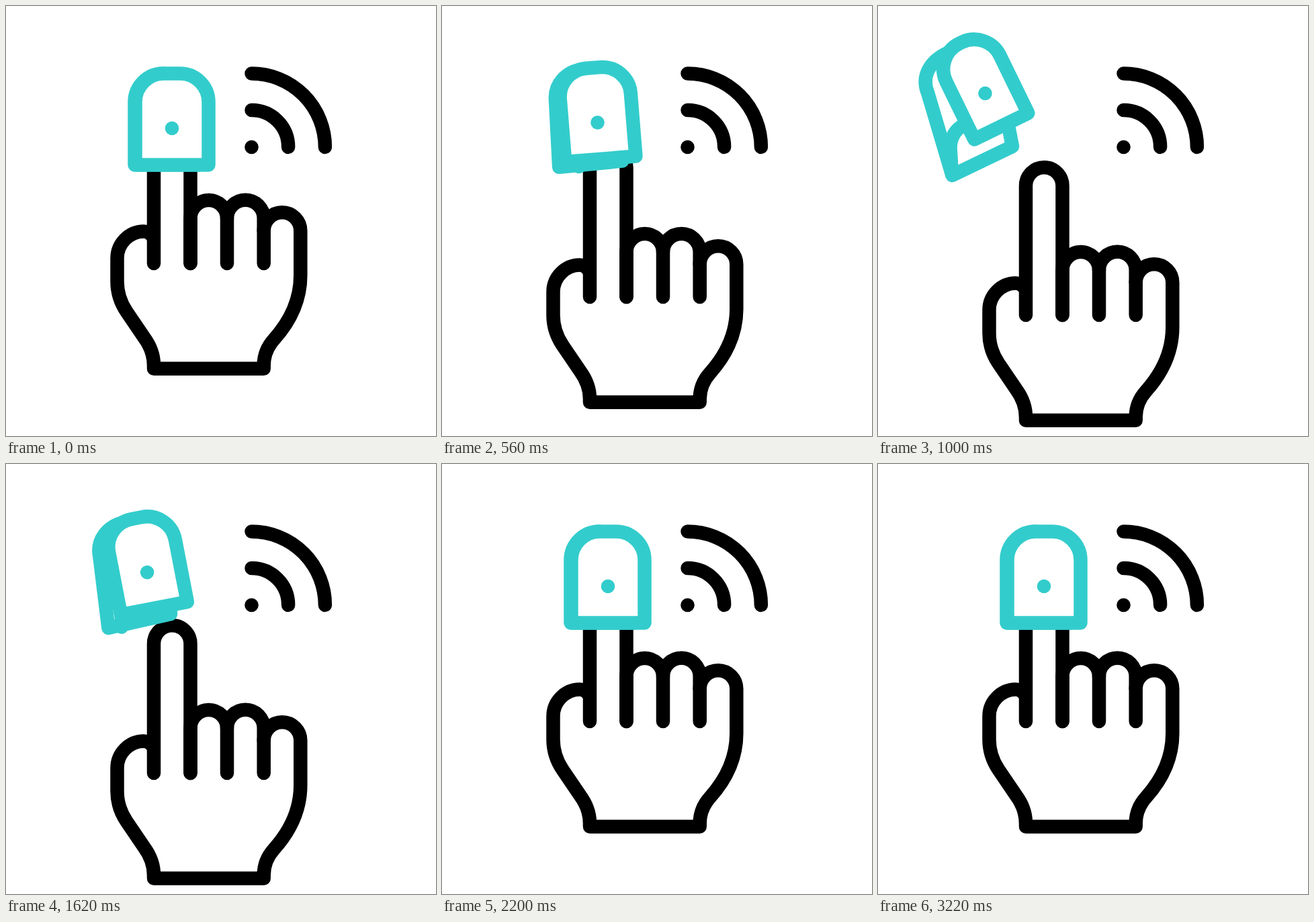
Recreate the animation shown at these times as an HTML page. Size 640x640 px, loop 3.6 s.

```html
<!DOCTYPE html>
<html lang="en">
<head>
<meta charset="utf-8">
<title>Fingertip sensor</title>
<style>
  html, body { margin: 0; width: 100%; height: 100%; overflow: hidden; background: #fff; }
  svg { display: block; width: 100%; height: 100%; }
  .line { fill: none; stroke-width: 20.5; stroke-linecap: round; stroke-linejoin: round; }
  .ink { stroke: #000; }
  .teal { stroke: #33cccc; }
  .solid { fill: #fff; }
</style>
</head>
<body>
<svg viewBox="0 0 640 640">
  <g id="hand" class="line ink">
    <path d="M220 383V190.5A27.25 27.25 0 0 1 274.5 190.5V383"/>
    <path d="M274.5 383V316.2A27.25 27.25 0 0 1 329 316.2V383"/>
    <path d="M329 316.2A27.25 27.25 0 0 1 383.7 316.2V383"/>
    <path d="M383.7 334.5A27.25 27.25 0 0 1 438.3 334.5V401C438.3 436 424 468 399 496C389 507 383.7 520 383.7 535V539.7H220V535C220 519 214 505 206 494L179.5 455C170 441 165.5 426 165.5 410V375.5A40 40 0 0 1 205 335.5Q213 335.5 217 342"/>
  </g>
  <circle id="dot" cx="365.5" cy="210" r="10.3"/>
  <path id="near" class="line ink" d="M365.5 155A54.6 54.6 0 0 1 420.1 210"/>
  <path id="far" class="line ink" d="M365.5 100.5A109.4 109.4 0 0 1 474.9 210"/>
  <path id="back" class="line teal solid"/>
  <path id="arch" class="line teal"/>
  <g id="front">
    <path id="shell" class="line teal solid"/>
    <circle r="10.3" fill="#33cccc"/>
  </g>
</svg>
<script>
const LOOP = 3600;
const el = id => document.getElementById(id);
const [hand, dot, near, far, back, arch, front, shell] =
  ["hand", "dot", "near", "far", "back", "arch", "front", "shell"].map(el);

// Eased 0..1 between two times
function ease(t, from, to) {
  const p = Math.min(1, Math.max(0, (t - from) / (to - from)));
  return p * p * (3 - 2 * p);
}

const pulse = (t, a, b, c, d) => ease(t, a, b) - ease(t, c, d);

// Point going from closed to open, with a slight lead given by k
function point(s, k, x0, y0, x1, y1) {
  const p = s * (1 + k * (1 - s));
  return `${(x0 + (x1 - x0) * p).toFixed(2)} ${(y0 + (y1 - y0) * p).toFixed(2)}`;
}

function drawClip(s) {
  const low = (...p) => point(s, 0.25, ...p);
  const high = (...p) => point(s, 0.1, ...p);

  back.setAttribute("d",
    `M${low(191.5, 236.5, 110.5, 252)}` +
    `L${high(191.5, 143, 74.3, 130)}` +
    `C${high(191.5, 119.5, 63.5, 104)} ${high(210.5, 100.5, 78, 81)} ${high(234, 100.5, 105, 69)}` +
    `L${low(287, 200, 194, 178)}` +
    `L${low(287, 236.5, 200, 209)}Z`);

  arch.setAttribute("d",
    `M${low(230, 236, 110, 250)}` +
    `L${low(231, 215, 107.7, 213)}` +
    `C${low(231, 208, 107, 198)} ${low(238, 200, 114, 184)} ${low(250, 200, 128, 177)}`);

  const w = 54.5 - 10 * s, r = 42.5, top = -81.5 - 2 * s;
  shell.setAttribute("d",
    `M${-w} 54.5V${top + r}A${r} ${r} 0 0 1 ${r - w} ${top}` +
    `H${w - r}A${r} ${r} 0 0 1 ${w} ${top + r}V54.5Z`);
  front.setAttribute("transform",
    `translate(${247 - 87.5 * s} ${182 - 47 * s - 5 * s * s}) rotate(${-26 * s})`);
}

function draw(t) {
  const drop = 77 * pulse(t, 200, 800, 1800, 2200);
  hand.setAttribute("transform", `translate(0 ${drop})`);
  drawClip(pulse(t, 400, 1000, 1400, 1800));

  // Signal parts go out one by one, then come back in the same order
  [dot, near, far].forEach((part, i) => {
    const off = 2200 + 200 * i, on = off + 400;
    part.setAttribute("opacity", 1 - pulse(t, off, off + 200, on, on + 200));
  });
}

const start = performance.now();
function tick() {
  draw((performance.now() - start) % LOOP);
  requestAnimationFrame(tick);
}
tick();
</script>
</body>
</html>
```
